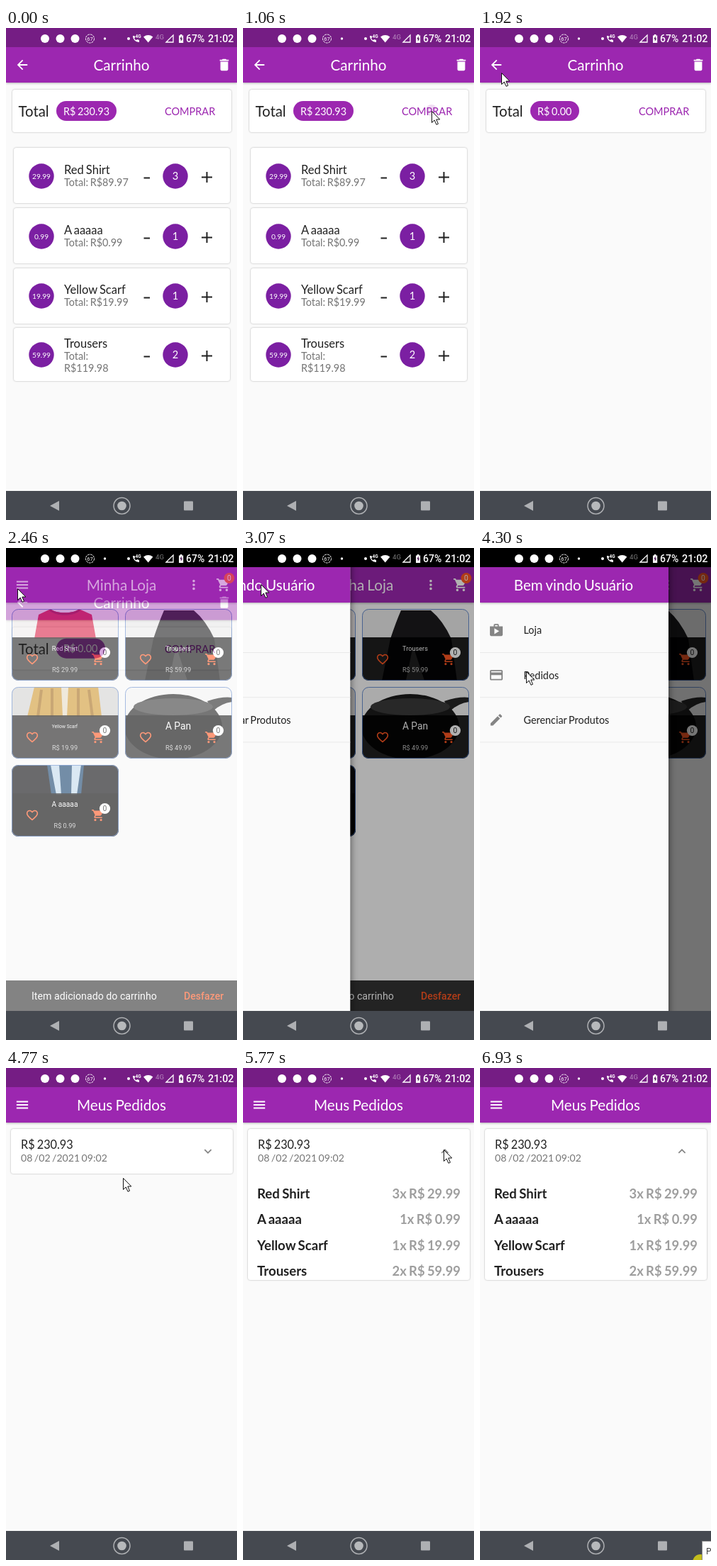
Write an HTML page that moves like this. It is 326 by 694 pixels and loops after 7 s.

```html
<!DOCTYPE html>
<html lang="pt">
<head>
<meta charset="utf-8">
<title>Carrinho</title>
<style>
html, body { margin: 0; width: 100%; height: 100%; overflow: hidden; background: #fafafa; }
svg { display: block; width: 326px; height: 694px; font-family: Lato, sans-serif; word-spacing: -.07em; }
.ro { font-family: Roboto, sans-serif; word-spacing: 0; }
.card { fill: #fff; filter: drop-shadow(0 .6px 1px rgba(0,0,0,.3)); }
.bar { filter: drop-shadow(0 1px 1.5px rgba(0,0,0,.3)); }
</style>
</head>
<body>
<svg id="stage" viewBox="0 0 326 694"></svg>
<script>
const PURPLE = '#9c27b0', DEEP = '#7b1fa2', ORANGE = '#ff5722', INK = '#212121', GREY = '#757575';
const LOOP = 7000, STEPS = 91, STEP = LOOP / STEPS;

const ICONS = {
  back: 'M20 11H7.83l5.59-5.59L12 4l-8 8 8 8 1.41-1.41L7.83 13H20z',
  trash: 'M6 19c0 1.1.9 2 2 2h8c1.1 0 2-.9 2-2V7H6zM19 4h-3.5l-1-1h-5l-1 1H5v2h14z',
  menu: 'M3 18h18v-2H3zm0-5h18v-2H3zm0-7v2h18V6z',
  more: 'M12 8a2 2 0 1 0 0-4 2 2 0 0 0 0 4zm0 2a2 2 0 1 0 0 4 2 2 0 0 0 0-4zm0 6a2 2 0 1 0 0 4 2 2 0 0 0 0-4z',
  cart: 'M7 18a2 2 0 1 0 0 4 2 2 0 0 0 0-4zM1 2v2h2l3.6 7.59-1.35 2.45C4.5 15.4 5.5 17 7 17h12v-2H7.42a.25.25 0 0 1-.22-.37L8.1 13h7.45c.75 0 1.41-.41 1.75-1.03l3.58-6.49A1 1 0 0 0 20 4H5.21l-.94-2zm16 16a2 2 0 1 0 0 4 2 2 0 0 0 0-4z',
  heart: 'M16.5 3c-1.74 0-3.41.81-4.5 2.09C10.91 3.81 9.24 3 7.5 3 4.42 3 2 5.42 2 8.5c0 3.78 3.4 6.86 8.55 11.54L12 21.35l1.45-1.32C18.6 15.36 22 12.28 22 8.5 22 5.42 19.58 3 16.5 3zm-4.5 15.6C7.14 14.24 4 11.39 4 8.5 4 6.5 5.5 5 7.5 5c1.54 0 3.04.99 3.57 2.36h1.87C13.46 5.99 14.96 5 16.5 5c2 0 3.5 1.5 3.5 3.5 0 2.89-3.14 5.74-8 10.1z',
  shop: 'M16 6V4c0-1.11-.89-2-2-2h-4c-1.11 0-2 .89-2 2v2H2v13c0 1.11.89 2 2 2h16c1.11 0 2-.89 2-2V6zm-6-2h4v2h-4zM9 18V9l7.5 4.5z',
  credit: 'M20 4H4a2 2 0 0 0-2 2v12c0 1.11.89 2 2 2h16c1.11 0 2-.89 2-2V6a2 2 0 0 0-2-2zm0 14H4v-6h16zm0-10H4V6h16z',
  edit: 'M3 17.25V21h3.75L17.81 9.94l-3.75-3.75zM20.71 7.04a1 1 0 0 0 0-1.41l-2.34-2.34a1 1 0 0 0-1.41 0l-1.83 1.83 3.75 3.75z',
  down: 'M16.59 8.59L12 13.17 7.41 8.59 6 10l6 6 6-6z'
};

const icon = (name, cx, cy, fill, size = 21.7) =>
  `<path d="${ICONS[name]}" fill="${fill}" fill-rule="evenodd" transform="translate(${cx} ${cy}) scale(${size / 24}) translate(-12 -12)"/>`;
const text = (x, y, s, size, fill, extra = '') =>
  `<text x="${x}" y="${y}" font-size="${size}" fill="${fill}" ${extra}>${s}</text>`;
const mid = (x, y, s, size, fill, extra = '') => text(x, y, s, size, fill, 'text-anchor="middle" ' + extra);
const rect = (x, y, w, h, fill, extra = '') =>
  `<rect x="${x}" y="${y}" width="${w}" height="${h}" fill="${fill}" ${extra}/>`;
const circle = (cx, cy, r, fill, extra = '') => `<circle cx="${cx}" cy="${cy}" r="${r}" fill="${fill}" ${extra}/>`;
const shape = (d, fill, extra = '') => `<path d="${d}" fill="${fill}" ${extra}/>`;
const card = (x, y, w, h, extra = '') => rect(x, y, w, h, '#fff', `rx="3.5" class="card" ${extra}`);
const group = (id, body, extra = '') => `<g id="${id}" ${extra}>${body}</g>`;
const bar = title => rect(0, 0, 326, 694, '#fafafa') +
  rect(0, 0, 326, 77, PURPLE, 'class="bar"') + mid(163, 60, title, 20.7, '#fff');

const goods = [
  { name: 'Red Shirt', price: '29.99', n: 3, sub: ['Total: R$89.97'], y: 169, h: 78, cy: 209 },
  { name: 'A aaaaa', price: '0.99', n: 1, sub: ['Total: R$0.99'], y: 254, h: 78, cy: 294 },
  { name: 'Yellow Scarf', price: '19.99', n: 1, sub: ['Total: R$19.99'], y: 339, h: 78, cy: 378 },
  { name: 'Trousers', price: '59.99', n: 2, sub: ['Total:', 'R$119.98'], y: 423, h: 75, cy: 461 }
];

function cartRow(g) {
  const top = g.cy - (g.sub.length > 1 ? 10.5 : 3.5);
  return card(11, g.y, 305, g.h) + circle(50, g.cy, 17.7, DEEP) + mid(50, g.cy + 3.6, g.price, 10.2, '#fff') +
    text(82, top, g.name, 16.5, INK) +
    g.sub.map((s, i) => text(82, top + 17.6 + i * 17, s, 14.4, GREY)).join('') +
    circle(239, g.cy, 17.7, DEEP) + mid(239, g.cy + 5.3, g.n, 14.6, '#fff') +
    `<path d="M194.5 ${g.cy + 2.5}h8.5M276 ${g.cy + 1.5}h15m-7.5-7.5v15" stroke="${INK}" stroke-width="2"/>`;
}

function cartPage() {
  return bar('Carrinho') + icon('back', 23, 52, '#fff') + icon('trash', 308, 52, '#fff') +
    card(9, 87, 309, 60) + text(17.5, 125, 'Total', 20.4, INK) +
    rect(71, 103, 85, 28, PURPLE, 'rx="14" id="pill"') + text(81, 122.5, '', 14.4, '#fff', 'id="sum"') +
    text(224, 123, 'COMPRAR', 14.5, PURPLE) + circle(266, 116, 0, PURPLE, 'id="ripple" opacity=".16"') +
    group('rows', goods.map(cartRow).join(''));
}

// Simple stand-ins for the product pictures, drawn in a 151 x 101 tile.
const backdrop = fill => rect(0, 0, 151, 101, fill);
const art = {
  shirt: backdrop('#f1eeee') + shape('M55 0C62 7 88 7 95 0L113 8 119 42H32L38 8z', '#da2349') +
    shape('M55 0C62 7 88 7 95 0L97 2C88 11 62 11 53 2z', '#ad1740'),
  trousers: backdrop('#ececec') +
    shape('M55 2H97Q114 16 126 42L134 101H88L72 52 62 101H28L40 42Q48 18 55 2z', '#1b1a1d'),
  scarf: backdrop('#d6d5d4') + shape('M32 0H122L127 42H22z', '#d39a33') +
    shape('M42 4l-5 38M57 2v40M94 2v40M109 4l5 38', 'none', 'stroke="#a96f1a" stroke-width="4"') +
    shape('M70 0h10l-2 42h-6z', '#e9dfc8'),
  pan: backdrop('#f6f6f6') + shape('M116 20Q138 13 151 15V21Q136 23 124 34z', '#262626') +
    '<ellipse cx="68" cy="56" rx="69" ry="46" fill="#1c1c1c"/><ellipse cx="68" cy="28" rx="56" ry="12" fill="#3a3a3a"/>',
  jeans: backdrop('#08090c') + shape('M50 0H102L98 42H56z', '#17436f') +
    shape('M55 0H67L70 42H63zM85 0H98L92 42H84z', '#c4dcee')
};

const tiles = [
  [8, 86, 'shirt', 'Red Shirt', 9, '29.99'], [168, 86, 'trousers', 'Trousers', 9.2, '59.99'],
  [8, 196, 'scarf', 'Yellow Scarf', 6.6, '19.99'], [168, 196, 'pan', 'A Pan', 13.8, '49.99'],
  [8, 306, 'jeans', 'A aaaaa', 10.2, '0.99']
];

function tile([x, y, pic, name, size, price]) {
  return `<g transform="translate(${x} ${y})"><g clip-path="url(#tile)">${art[pic]}${rect(0, 40, 151, 61, '#000', 'opacity=".87"')}</g>` +
    rect(.5, .5, 150, 100, 'none', 'rx="9" stroke="#4a78c8" stroke-width=".8"') +
    icon('heart', 29, 71, ORANGE, 19.5) + icon('cart', 122, 71, ORANGE, 19.5) +
    circle(131.5, 61.5, 7.6, '#fff') +
    `<g class="ro">${mid(131.5, 65.2, '0', 10.4, INK)}${mid(75, 55.5 + size * .36, name, size, '#fff')}${mid(75, 88.8, 'R$ ' + price, 9.2, '#c8c8c8')}</g></g>`;
}

function shopPage() {
  return bar('Minha Loja') + icon('menu', 23, 52, '#fff') + icon('more', 265, 52, '#fff') + icon('cart', 307, 52, '#fff') +
    circle(315, 42.5, 7.4, ORANGE) + mid(315, 46.3, '0', 10.4, '#fff', 'class="ro"') + tiles.map(tile).join('') +
    group('snack', rect(0, 610, 326, 60, '#323232') + text(36, 636.5, 'Item adicionado do carrinho', 14.2, '#fff') +
      text(251, 636.5, 'Desfazer', 14.1, ORANGE, 'font-weight="500"'), 'class="ro"');
}

function drawer() {
  const items = [['shop', 'Loja'], ['credit', 'Pedidos'], ['edit', 'Gerenciar Produtos']];
  return rect(0, 0, 266, 694, '#fafafa', 'style="filter:drop-shadow(1px 0 5px rgba(0,0,0,.5))"') +
    rect(0, 0, 266, 77, PURPLE, 'class="bar"') + mid(132, 60, 'Bem vindo Usuário', 20.6, '#fff') +
    rect(0, 148, 266, 62, '#000', 'id="press" opacity="0"') +
    items.map(([name, label], i) => {
      const y = 116 + i * 63.2;
      return icon(name, 23, y, '#858585') + text(61.5, y + 5.3, label, 14.4, INK) + rect(0, y + 31, 266, 1, '#e9e9e9');
    }).join('');
}

function ordersPage() {
  return bar('Meus Pedidos') + icon('menu', 23, 52, '#fff') + card(7, 86, 313, 63, 'id="order"') +
    text(21, 113.5, 'R$ 230.93', 16.3, INK) + text(21, 131.5, '08 /02 /2021 09:02', 14.1, GREY) +
    group('chevron', icon('down', 285, 117.5, '#858585', 21)) +
    group('detail', goods.map((g, i) => {
      const y = 184.3 + i * 36.1;
      return text(20, y, g.name, 18.6, INK) + text(307, y, `${g.n}x R$ ${g.price}`, 18.4, '#9e9e9e', 'text-anchor="end"');
    }).join(''), 'font-weight="700"');
}

function systemBars() {
  const status = rect(0, 0, 326, 27, '#000', 'id="status"') +
    [55, 76.5, 97.5].map(x => circle(x, 15, 6, '#fff')).join('') +
    circle(118.5, 15, 6, 'none', 'stroke="#fff" stroke-dasharray="3 1"') + mid(118.5, 17.8, '67', 7.5, '#fff') +
    circle(139.5, 15, 1.7, '#fff') + circle(173, 15, 2, '#fff') +
    shape('M179 11c0 5 4 9 9 9v-3l-3-1-1.3 1.3c-1.3-.8-2-1.6-2.7-2.8L182.3 13l-1-2z', '#fff') +
    text(182.5, 13.5, '4G', 6.5, '#fff', 'font-weight="700"') +
    shape('M194 12.5q6.7-4.8 13.4 0L200.7 20.5z', '#fff') +
    text(211, 15.5, '4G', 9.5, '#fff', 'opacity=".38" font-weight="500"') +
    shape('M226 20L236 10V20z', 'none', 'stroke="#fff" stroke-width="1.3"') +
    shape('M244 10.5h1.8V9h2.6v1.5h1.8V21H244z', '#fff') +
    shape('M247.8 11.5l-2.5 4h1.5v3.5l2.4-4.3h-1.4z', '#4a1552') +
    text(254, 20, '67%', 14, '#fff', 'font-weight="500"') + text(285, 20, '21:02', 14.4, '#fff', 'font-weight="500"');
  const nav = rect(0, 653, 326, 41, '#454950') + shape('M62 674L75 667V681z', '#aeb0b3') +
    circle(163.5, 674, 11.5, 'none', 'stroke="#aeb0b3" stroke-width="1.5"') + circle(163.5, 674, 6.3, '#b7b9bb') +
    rect(251, 667.5, 13, 13, '#aeb0b3', 'rx="1"');
  return `<g class="ro">${status}${nav}</g>`;
}

const stage = document.getElementById('stage');
stage.innerHTML = '<defs><clipPath id="tile"><rect width="151" height="101" rx="9"/></clipPath></defs>' +
  group('shop', shopPage()) + rect(0, 0, 326, 694, '#000', 'id="scrim"') + group('drawer', drawer()) +
  group('cart', cartPage()) + group('orders', ordersPage()) + systemBars() +
  circle(311, 697, 11, '#c3bd1c', 'id="glow"') +
  group('tip', rect(313.5, 667.5, 30, 40, '#fff', 'stroke="#8a8a8a"') + text(319, 686, 'P', 12, '#444', 'class="ro"')) +
  shape('M.5.5V16.5L4.2 13 7 19.3 9.5 18.2 6.8 12H11.8z', '#fff', 'id="cursor" stroke="#111" stroke-linejoin="round"');

const el = {};
stage.querySelectorAll('[id]').forEach(e => el[e.id] = e);
const set = (id, attrs) => { for (const k in attrs) el[id].setAttribute(k, attrs[k]); };
const show = (id, on) => set(id, { display: on ? 'inline' : 'none' });

const ramp = (t, from, to) => Math.min(1, Math.max(0, (t - from) / (to - from)));
const smooth = p => p * p * (3 - 2 * p);
function bezier(x1, y1, x2, y2) {
  const at = (a, b, s) => 3 * a * s * (1 - s) ** 2 + 3 * b * s * s * (1 - s) + s ** 3;
  return x => {
    let lo = 0, hi = 1;
    for (let i = 0; i < 20; i++) {
      const m = (lo + hi) / 2;
      if (at(x1, x2, m) < x) lo = m; else hi = m;
    }
    return at(y1, y2, lo);
  };
}
const easeIn = bezier(.42, 0, 1, 1), slowIn = bezier(.4, 0, .2, 1);

// Time, x, y of the pointer tip.
const path = [
  [0, 328, 606], [700, 258, 140], [830, 266, 117], [1390, 266, 117], [1923, 30, 63], [2100, 30, 63],
  [2461, 16, 57], [2700, 16, 57], [3077, 25, 51], [3600, 25, 51], [4200, 65, 174], [4460, 65, 174],
  [4769, 165, 155], [5160, 165, 155], [5600, 283, 115], [5980, 283, 115], [6650, 311, 700], [7000, 311, 700]
];
function pointer(t) {
  const i = Math.max(1, path.findIndex(k => k[0] > t));
  const [t0, x0, y0] = path[i - 1], [t1, x1, y1] = path[i];
  const p = smooth(ramp(t, t0, t1));
  return `translate(${x0 + (x1 - x0) * p} ${y0 + (y1 - y0) * p})`;
}

// Pages rise a quarter of the screen while fading in.
function page(id, p) {
  show(id, p > 0);
  set(id, { opacity: easeIn(p), transform: `translate(0 ${173.5 * (1 - slowIn(p))})` });
}

function draw(t) {
  const bought = t >= 1300, open = t >= 5690;
  const slide = ramp(t, 2937, 3183);

  page('cart', 1 - ramp(t, 2335, 2635));
  page('orders', ramp(t, 4430, 4730));
  show('rows', !bought);
  el.sum.textContent = bought ? 'R$ 0.00' : 'R$ 230.93';
  set('pill', { width: bought ? 69 : 85 });
  set('ripple', { r: t > 1000 && t < 1400 ? 4 + 8 * ramp(t, 1000, 1150) : 0 });

  set('snack', { transform: `translate(0 ${45 * smooth(ramp(t, 3700, 3950))})` });
  set('scrim', { opacity: .54 * slide });
  show('drawer', slide > 0);
  set('drawer', { transform: `translate(${-266 * (1 - slide)} 0)` });
  set('press', { opacity: t > 4370 ? .07 : 0 });

  set('order', { height: open ? 213 : 63 });
  set('chevron', { transform: open ? 'rotate(180 285 117.5)' : '' });
  show('detail', open);
  set('status', { opacity: t >= 2335 && t < 4500 ? 1 : .25 });

  show('glow', t > 6600);
  show('tip', t > 6800);
  set('cursor', { transform: pointer(t) });
}

function tick(now) {
  const n = Math.min(STEPS - 1, Math.floor((now % LOOP + 17) / STEP));
  draw(n * STEP);
  requestAnimationFrame(tick);
}
draw(0);
requestAnimationFrame(tick);
</script>
</body>
</html>
```
